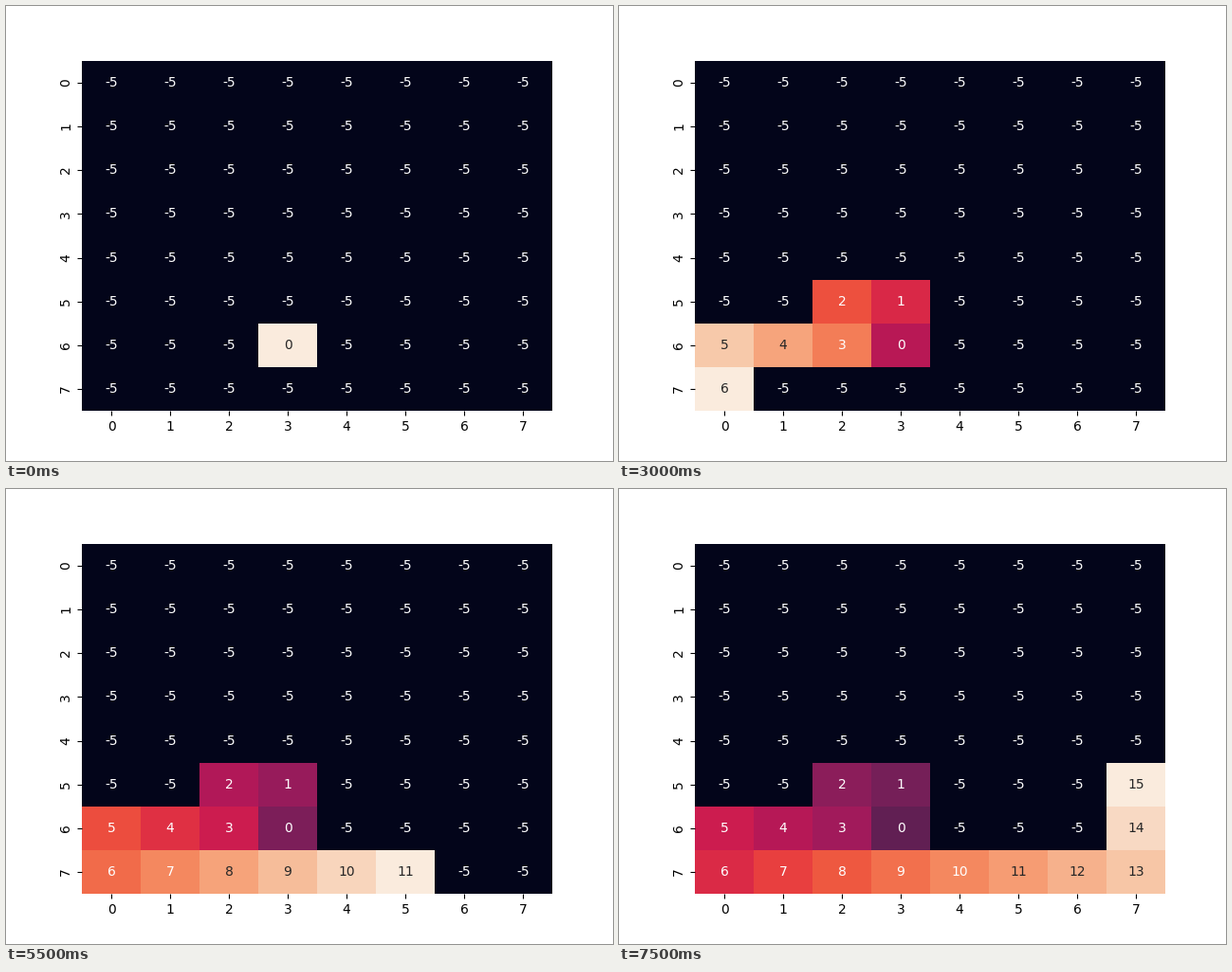
Write a matplotlib script that moves like this. It is 640 px wide and 480 px high and loops after 8 s.

```python
import numpy as np
import matplotlib.pyplot as plt
from matplotlib.animation import FuncAnimation
from matplotlib.colors import LinearSegmentedColormap, Normalize

SIZE = 8
EMPTY = -5
PATH = [(6, 3), (5, 3), (5, 2), (6, 2), (6, 1), (6, 0)]
PATH += [(7, col) for col in range(SIZE)] + [(6, 7), (5, 7)]

ROCKET = [
    (0, "#03051A"), (1 / 7, "#35193E"), (1 / 4, "#611F53"), (2 / 7, "#701F57"),
    (1 / 3, "#841E5A"), (2 / 5, "#A11A5B"), (3 / 7, "#AD1759"), (1 / 2, "#CB1B4F"),
    (6 / 11, "#D92847"), (4 / 7, "#E13342"), (3 / 5, "#E83F3F"), (7 / 11, "#ED513E"),
    (2 / 3, "#F06043"), (5 / 7, "#F37651"), (3 / 4, "#F4875E"), (7 / 9, "#F5946B"),
    (4 / 5, "#F69C73"), (5 / 6, "#F6AA82"), (6 / 7, "#F6B48F"), (8 / 9, "#F6C19F"),
    (10 / 11, "#F7C9AA"), (1, "#FAEBDD"),
]
cmap = LinearSegmentedColormap.from_list("rocket", ROCKET, N=256)


def text_color(rgba):
    """Dark text on light cells, white on dark ones."""
    rgb = np.array(rgba[:3])
    linear = np.where(rgb <= 0.03928, rgb / 12.92, ((rgb + 0.055) / 1.055) ** 2.4)
    return ".15" if linear @ [0.2126, 0.7152, 0.0722] > 0.408 else "w"


def board(step):
    grid = np.full((SIZE, SIZE), EMPTY)
    for visit, cell in enumerate(PATH[:step + 1]):
        grid[cell] = visit
    return grid


plt.rcParams["font.family"] = "DejaVu Sans"
fig, ax = plt.subplots(figsize=(6.4, 4.8), dpi=100)
mesh = ax.pcolormesh(board(0), cmap=cmap, vmin=EMPTY, vmax=0)
ax.set(xlim=(0, SIZE), ylim=(SIZE, 0))
ax.spines[:].set_visible(False)
centers = np.arange(SIZE) + 0.5
ax.set_xticks(centers, range(SIZE))
ax.set_yticks(centers, range(SIZE), rotation="vertical", va="center")
labels = {
    (row, col): ax.text(col + 0.5, row + 0.5, "", ha="center", va="center")
    for row in range(SIZE) for col in range(SIZE)
}


def update(step):
    grid = board(step)
    norm = Normalize(EMPTY, step)
    mesh.set_array(grid)
    mesh.set_clim(EMPTY, step)
    for cell, label in labels.items():
        label.set_text(str(grid[cell]))
        label.set_color(text_color(cmap(norm(grid[cell]))))
    return [mesh, *labels.values()]


anim = FuncAnimation(fig, update, frames=len(PATH), interval=500, repeat=True)
plt.show()
```
